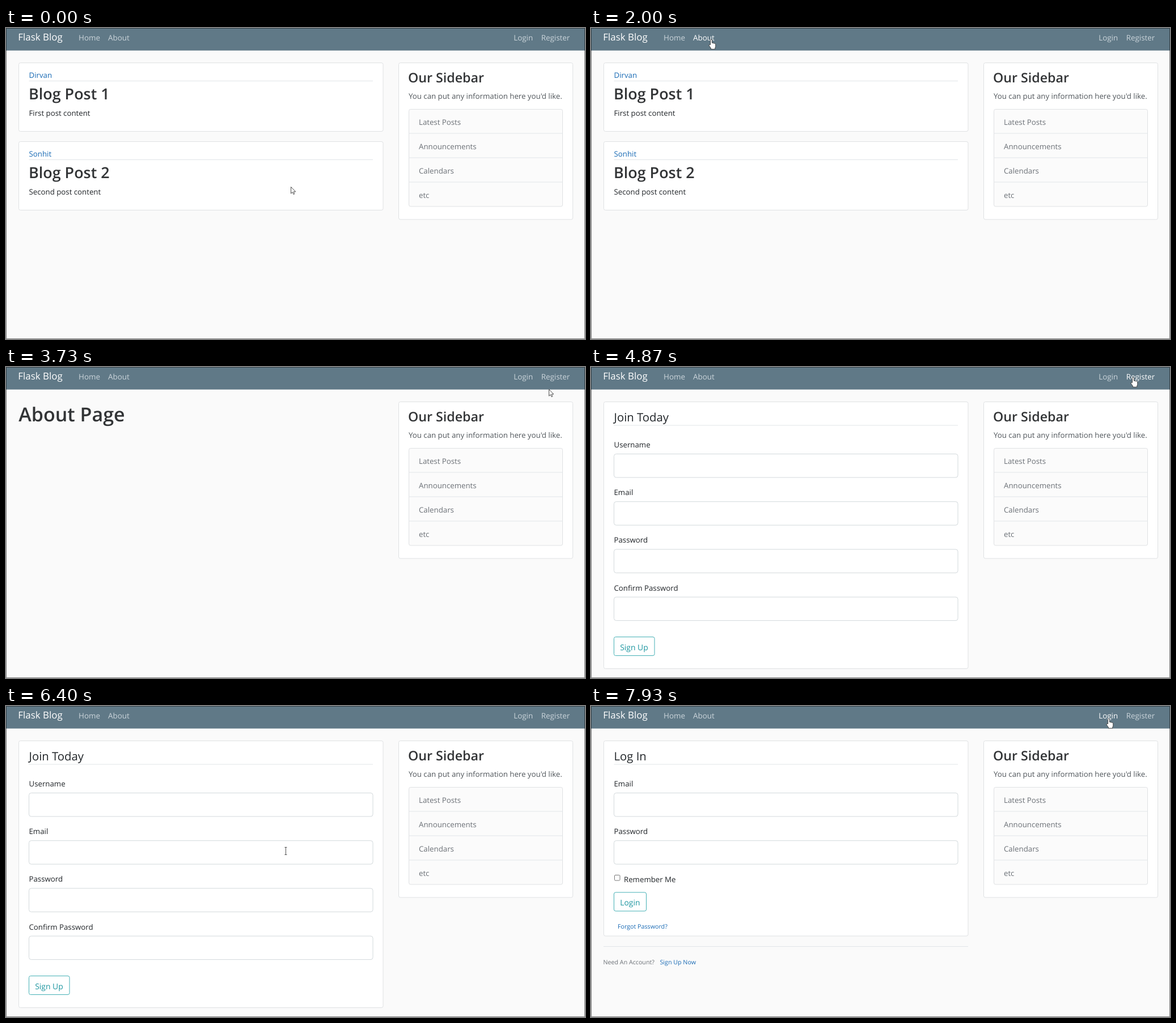
Recreate the animation shown at these times as an HTML page. Size 1021 by 549 pixels, loop 8000 ms.

```html
<!DOCTYPE html>
<html lang="en">
<head>
<meta charset="utf-8">
<title>Flask Blog</title>
<style>
html, body { margin: 0; height: 100%; overflow: hidden; background: #fafafa; }
svg { display: block; width: 100%; height: 100%; }
text { font-family: "Open Sans", "Noto Sans", sans-serif; fill: #212529; text-rendering: geometricPrecision; }
.bold { font-weight: 600; fill: #323436; }
.cursor { fill: #fff; stroke: #3c3c3c; stroke-width: .9; stroke-linejoin: round; }
</style>
</head>
<body>
<svg id="stage" viewBox="0 0 1021 549"></svg>
<script>
const stage = document.getElementById('stage');
const LOOP = 8000, FPS = 15;
const BODY = 13.25, SMALL = 10.7, LEFT = 40.5, RIGHT = 647;
const BLUE = '#1a6bb5', TEAL = '#1d96a0', GREY = '#6c7177', BORDER = '#dfe1e3';

const text = (x, y, str, size = BODY, fill = '') =>
  `<text x="${x}" y="${y}" font-size="${size}" style="${fill && 'fill:' + fill}">${str}</text>`;
const heading = (x, y, str, size) => `<g class="bold">${text(x, y, str, size, 'inherit')}</g>`;
const box = (x, y, w, h, stroke = BORDER, fill = '#fff', r = 3) =>
  `<rect x="${x}" y="${y}" width="${w}" height="${h}" rx="${r}" fill="${fill}" stroke="${stroke}"/>`;
const rule = (x, y, right) => `<path d="M${x} ${y}H${right}" stroke="#e1e5e8"/>`;
const card = (top, height) => box(22.5, top, 642.5, height);

const fieldTop = i => 153.5 + 84.2 * i;
const FIELD_HEIGHT = 41.5;
const field = (label, i) =>
  text(LEFT, fieldTop(i) - 11.5, label) +
  box(LEFT, fieldTop(i), RIGHT - LEFT, FIELD_HEIGHT, '#d3d9dc', '#fff', 4);
const form = (title, height, labels) =>
  card(61.5, height) + text(LEFT, 96, title, 20.3) + rule(LEFT, 103, RIGHT) + labels.map(field).join('');
const button = (top, width, label) =>
  box(LEFT, top, width, 33, '#45b0b5') + text(LEFT + 10.7, top + 23, label, 13.9, TEAL);

const post = (author, i) => {
  const top = 61.5 + 139 * i;
  return card(top, 121) + text(LEFT, top + 26.5, author, BODY, BLUE) + rule(LEFT, top + 32, RIGHT) +
    heading(LEFT - .5, top + 64, 'Blog Post ' + (i + 1), 26.9) +
    text(LEFT, top + 93.5, ['First', 'Second'][i] + ' post content');
};

const forms = { join: ['Username', 'Email', 'Password', 'Confirm Password'], login: ['Email', 'Password'] };
const pages = {
  home: ['Dirvan', 'Sonhit'].map(post).join(''),
  about: heading(22.3, 96.3, 'About Page', 34),
  join: form('Join Today', 471, forms.join) + button(476.5, 71.5, 'Sign Up'),
  login: form('Log In', 344.5, forms.login) +
    box(41.5, 298.5, 9.5, 9.5, '#777', '#fff', 1.5) + text(58, 310.5, 'Remember Me') +
    button(329, 57, 'Login') + text(47, 393.3, 'Forgot Password?', SMALL, BLUE) +
    rule(22, 424.5, 665) + text(21.5, 456, 'Need An Account?', SMALL, GREY) +
    text(121.5, 456, 'Sign Up Now', SMALL, BLUE)
};

const sidebar = box(692.5, 61.5, 307, 276.5) +
  heading(709, 96, 'Our Sidebar', 23.2) +
  text(710, 125, 'You can put any information here you\'d like.', BODY, '#50565b') +
  box(710.5, 143.5, 271, 171.5, BORDER, '#fbfbfb') +
  ['Latest Posts', 'Announcements', 'Calendars', 'etc'].map((item, i) =>
    text(728, 170.9 + 43 * i, item, BODY, GREY) + (i ? rule(710, 143 + 43 * i, 982) : '')).join('');

const links = { Home: 128, About: 180, Login: 895.2, Register: 943.7 };
const header = '<path d="M0 0H1021V39.7H0z" fill="#607987"/>' + text(21.3, 22, 'Flask Blog', 16.9, '#fff');
const frameEdge = '<path d="M.5 .5H1020.5V548.5H.5z" fill="none" stroke="#000" stroke-opacity=".5"/>';

const cursors = {
  arrow: 'M.5 .5V12.2L3.2 9.7 5 13.7 6.8 12.9 5 9H8.7z',
  hand: 'M-1.4 9.5V1.6a1.4 1.4 0 0 1 2.8 0V6.2l4.9 1.1q1.4.4 1.4 2v3q0 1.6-1 3V17.3H-.5v-1.6L-3.7 11.2q-.8-1.7.8-1.9z',
  beam: 'M-2 -6.5H2M0 -6.5V6.5M-2 6.5H2'
};

// Pointer moves: first tick, last tick, end point, optional point the curve bends towards
const START = [502, 280];
const moves = [
  [0, 5, [67, 86]],
  [7, 8, [46, 207]],
  [11, 17, [502, 279]],
  [17, 24, [46, 210], [260, -166]],
  [24, 30, [212, 20]],
  [39, 40, [211, 18]],
  [42, 55, [957, 44], [584, 160]],
  [55, 61, [957, 14]],
  [63, 64, [956, 18]],
  [73, 85, [300, 432], [371, 671]],
  [85, 98, [601, 349], [215, -16]],
  [98, 111, [921, 22], [1019, -10]],
  [117, 119, [913, 22]]
];

function pointerAt(tick) {
  let from = START;
  for (const [first, last, to, bend] of moves) {
    if (tick <= first) break;
    const k = Math.min(1, (tick - first) / (last - first));
    from = from.map((a, i) => {
      const mid = bend ? bend[i] : (a + to[i]) / 2;
      return a * (1 - k) ** 2 + 2 * mid * k * (1 - k) + to[i] * k * k;
    });
  }
  return from;
}

function pointerShape(page, x, y, link) {
  const onAuthor = page === 'home' && x > 40 && x < 83 && y > 77 && y < 92;
  if (link || onAuthor) return 'hand';
  const onField = (forms[page] || []).some((_, i) => y > fieldTop(i) && y < fieldTop(i) + FIELD_HEIGHT);
  return onField && x > LEFT && x < RIGHT ? 'beam' : 'arrow';
}

function draw(tick) {
  const page = tick < 38 ? 'home' : tick < 73 ? 'about' : tick < 114 ? 'join' : 'login';
  const [x, y] = pointerAt(tick);
  const names = Object.keys(links);
  const hovered = names.find(name => y < 32 && x >= links[name] && x <= links[name] + 6 + 6.5 * name.length);
  const loading = tick === 37 || (tick >= 113 && tick < 116);
  const nav = names.map(name =>
    text(links[name], 21.5, name, 13.4, name === hovered && !loading ? '#fff' : '#cbd5db')).join('');
  const shape = pointerShape(page, x, y, hovered);
  stage.innerHTML = header + nav + pages[page] + sidebar + frameEdge +
    `<path class="cursor" transform="translate(${x} ${y})" d="${cursors[shape]}"/>`;
}

// The picture holds between ticks; a few ms of lead absorb rounding.
const start = performance.now();
let shown = -1;
function update() {
  const time = (performance.now() - start + 4) % LOOP;
  const tick = Math.floor(time * FPS / 1000);
  if (tick !== shown) draw(shown = tick);
  requestAnimationFrame(update);
}
update();
</script>
</body>
</html>
```
